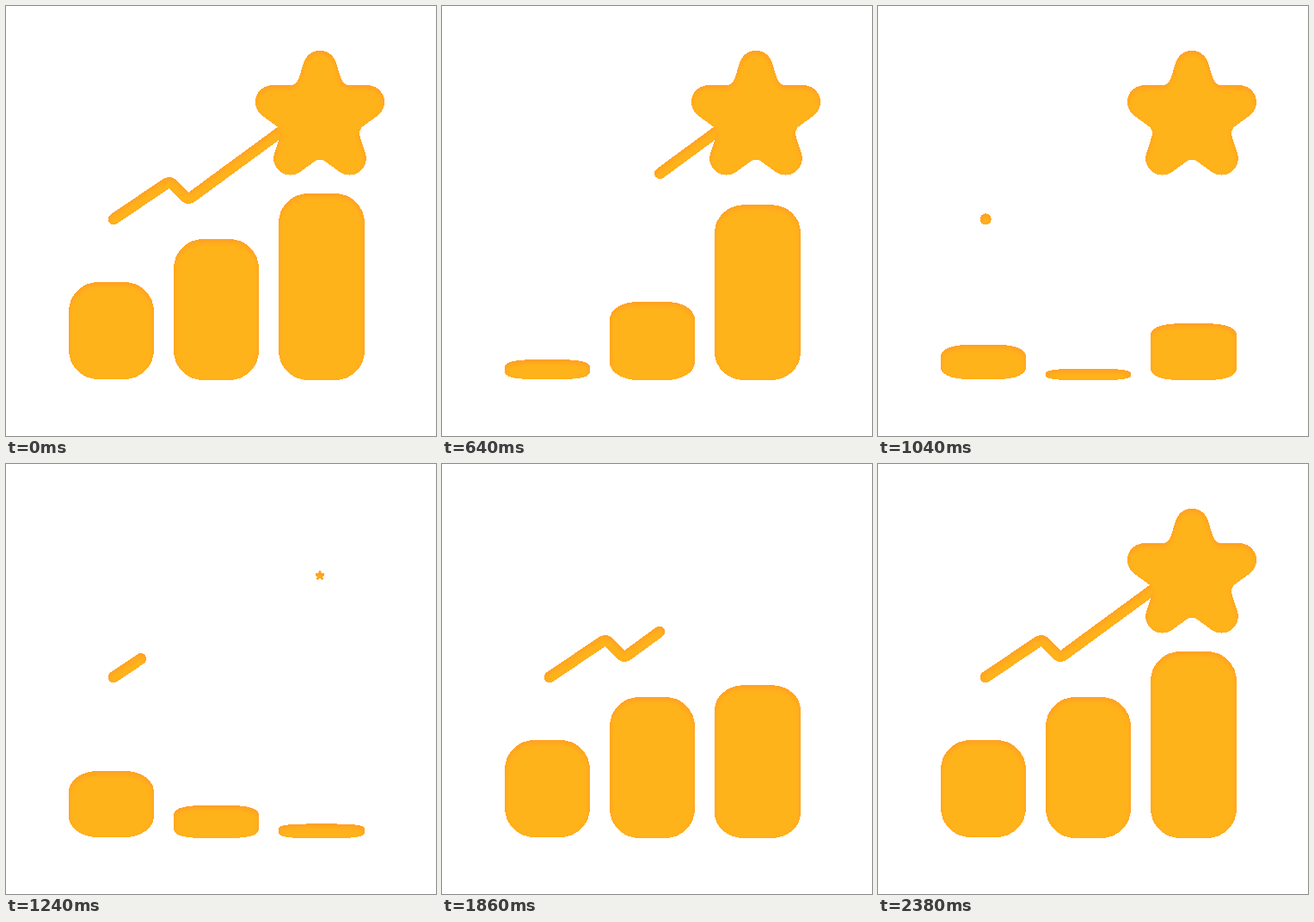
Recreate the animation shown at these times as an HTML page. Size 500 by 500 pixels, loop 2400 ms.

```html
<!DOCTYPE html>
<html lang="en">
<head>
<meta charset="utf-8">
<title>Growth chart</title>
<style>
  html, body { margin: 0; width: 100%; height: 100%; overflow: hidden; background: #fff; }
  svg { display: block; width: 100%; height: 100%; }
</style>
</head>
<body>
<svg viewBox="0 0 500 500" shape-rendering="crispEdges">
  <filter id="shade" filterUnits="userSpaceOnUse" x="0" y="0" width="500" height="500" color-interpolation-filters="sRGB">
    <feOffset in="SourceAlpha" dy="3"/>
    <feGaussianBlur stdDeviation="3" result="soft"/>
    <feFlood flood-color="#ff9c26"/>
    <feComposite operator="out" in2="soft"/>
    <feComposite operator="in" in2="SourceAlpha" result="rim"/>
    <feMerge><feMergeNode in="SourceGraphic"/><feMergeNode in="rim"/></feMerge>
  </filter>
  <g fill="#ffb31a">
    <g filter="url(#shade)"><path class="bar"/><path class="bar"/><path class="bar"/></g>
    <g filter="url(#shade)">
      <path id="line" fill="none" stroke="#ffb31a" stroke-width="13" stroke-linecap="round" stroke-linejoin="round"
        d="M125 248L185.4 207.1Q190 204 194 207.8L208 221.2Q212 225 216.4 221.8L332 137"/>
    </g>
    <g filter="url(#shade)"><path id="star"/></g>
  </g>
</svg>
<script>
const LOOP = 2400, TURN = 1040, LINE_END = 2380, BAR_TIME = 780;
const bars = [
  { x: 73, w: 99, bottom: 434, height: 113, low: 14.5, start: 0 },
  { x: 195, w: 99, bottom: 435, height: 164, low: 13, start: 260 },
  { x: 317, w: 100, bottom: 435, height: 217, low: 13.2, start: 520 }
];
const barPaths = document.querySelectorAll('.bar');
const line = document.getElementById('line');
const star = document.getElementById('star');

const mix = (a, b, p) => a + (b - a) * p;
const ease = (t, from, to) => {
  const s = Math.min(1, Math.max(0, (t - from) / (to - from)));
  return s * s * (3 - 2 * s);
};

// Corners flatten into pill ends as the bar sinks (p = 1 is lowest).
function barShape({ x, w, bottom, height, low }, p) {
  const rx = 34, h = mix(height, low, p), top = bottom - h;
  const ry = mix(34, low / 2, p), hx = rx * mix(.45, .03, p ** 3), hy = ry * .45;
  const r = x + w;
  return `M${x} ${top + ry}C${x} ${top + hy} ${x + hx} ${top} ${x + rx} ${top}H${r - rx}` +
    `C${r - hx} ${top} ${r} ${top + hy} ${r} ${top + ry}V${bottom - ry}` +
    `C${r} ${bottom - hy} ${r - hx} ${bottom} ${r - rx} ${bottom}H${x + rx}` +
    `C${x + hx} ${bottom} ${x} ${bottom - hy} ${x} ${bottom - ry}Z`;
}

function starShape() {
  const R = 58.4, round = 19.5, notch = 46.4, fillet = 8;
  const polar = (deg, r) => [r * Math.sin(deg * Math.PI / 180), -r * Math.cos(deg * Math.PI / 180)];
  const add = (a, b) => [a[0] + b[0], a[1] + b[1]];
  let d = '';
  for (let a = 0; a < 360; a += 72) {
    const tip = polar(a, R), inner = polar(a + 36, notch);
    d += `${d ? 'L' : 'M'}${add(tip, polar(a - 72, round))}` +
      `A${round} ${round} 0 0 1 ${add(tip, polar(a + 72, round))}` +
      `L${add(inner, polar(a - 18, fillet))}Q${inner} ${add(inner, polar(a + 90, fillet))}`;
  }
  return d + 'Z';
}

star.setAttribute('d', starShape());
const length = line.getTotalLength();

function draw(now) {
  const t = now % LOOP;
  bars.forEach((bar, i) => {
    const low = bar.start + BAR_TIME;
    const p = ease(t, bar.start, low) - ease(t, low, low + BAR_TIME);
    barPaths[i].setAttribute('d', barShape(bar, p));
  });

  // The line is eaten from its start, then drawn again from there.
  const erasing = t < TURN;
  const from = erasing ? length * t / TURN : 0;
  const to = erasing ? length : length * Math.min(1, (t - TURN) / (LINE_END - TURN));
  line.setAttribute('stroke-dasharray', `${Math.max(.01, to - from)} ${length * 2}`);
  line.setAttribute('stroke-dashoffset', -from);

  const size = 1 - ease(t, 1040, 1280) + ease(t, 2065, 2360);
  star.setAttribute('transform', `translate(365 129.8) scale(${size})`);
  star.style.display = size > 0 ? '' : 'none';
}

const begin = performance.now();
function tick() {
  draw(performance.now() - begin);
  requestAnimationFrame(tick);
}
tick();
</script>
</body>
</html>
```
